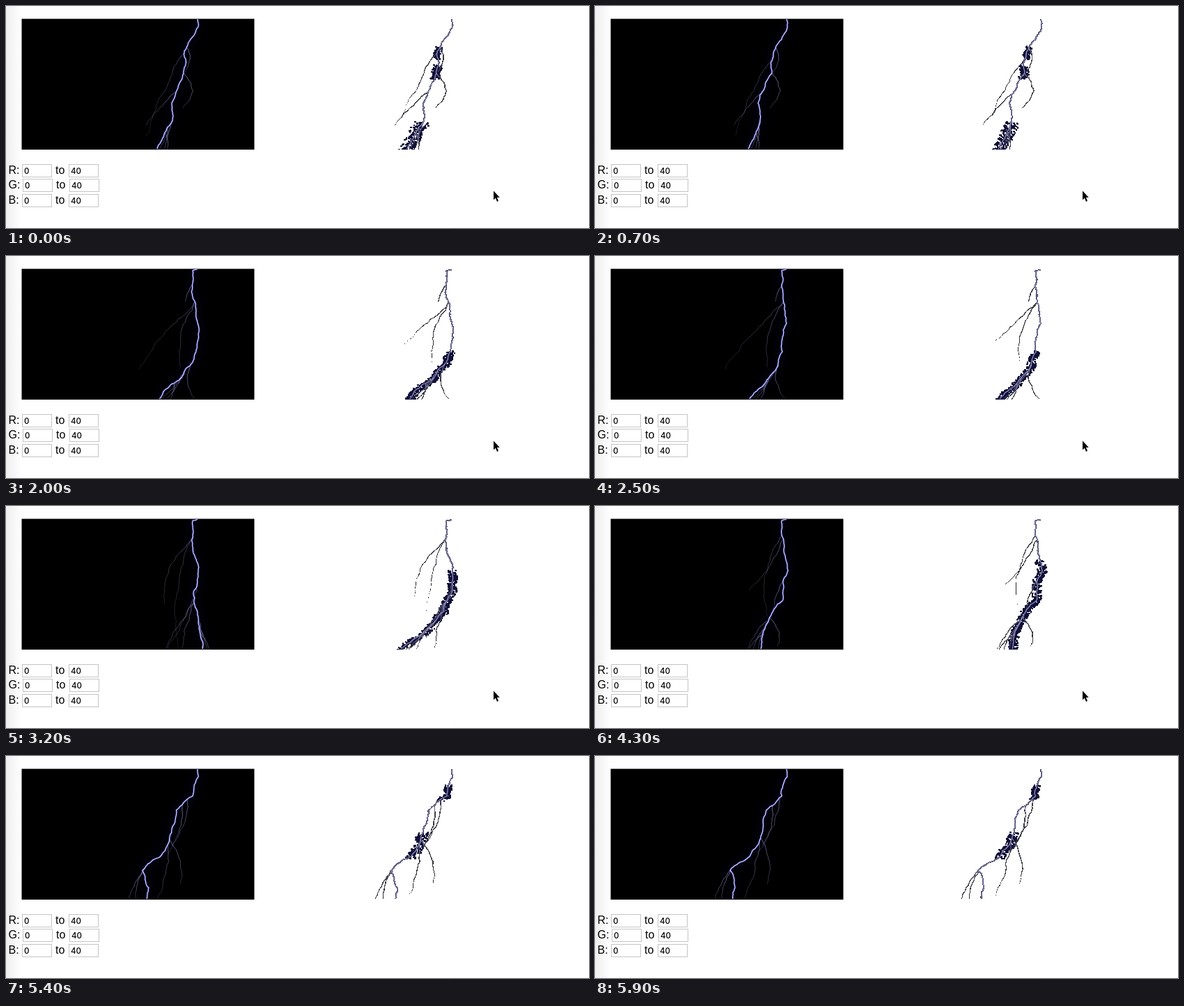
Recreate the animation shown at these times as an HTML page with a canvas. Size 837 by 320 pixels, loop 6000 ms.

```html
<!DOCTYPE html>
<html lang="en">
<head>
<meta charset="utf-8">
<title>Colour range key</title>
<style>
  html, body { margin: 0; width: 837px; height: 320px; overflow: hidden; background: #fff; }
  canvas { position: absolute; left: 0; top: 0; }
  span { position: absolute; font: 16px/18px "Liberation Sans", Arial, sans-serif; color: #000; white-space: pre; }
  .box {
    box-sizing: border-box; width: 43px; height: 19px; padding-left: 2px;
    border: 1px solid #c4c4c4; background: #fff;
    font: 500 11.5px/18px Inter, "Liberation Sans", sans-serif;
  }
</style>
</head>
<body>
<canvas id="stage" width="837" height="320"></canvas>
<script>
const STEP = 100, LOOP = 6000;
const VIEW = { x: 22.5, y: 18.5, w: 334, h: 188.5 };
const KEYED = { x: 361, y: 19, w: 369, h: 188 };
const GROUND = 207;

// How the channel leaves the cloud.
const SLOPED = [[275, 19], [276, 30], [270, 42]];
const HOOKED = [[275, 19], [268, 21], [268, 42]];

// main: bends of the channel; sides: [start y, end x, end y, bow];
// forks: sideways reach of the roots; glow: [top, bottom, width].
const bolts = [
  {
    at: 0, top: SLOPED, forks: 6,
    main: [[256, 65], [255, 97], [238, 140], [239, 165], [217, 206]],
    sides: [[66, 201, 188, -5], [122, 201, 172, -3], [95, 254, 147, 14], [58, 257, 95, 6]],
    glow: [[57, 75, 8], [85, 103, 10], [166, 207, 18]]
  },
  {
    at: 14, top: HOOKED, forks: 7,
    main: [[268, 58], [258, 64], [255, 97], [240, 123], [239, 165], [211, 206]],
    sides: [[64, 209, 180, -8], [135, 208, 180, -6], [100, 243, 150, 7], [140, 244, 206, 12]],
    glow: [[86, 135, 10], [167, 207, 14]]
  },
  {
    at: 25, top: HOOKED, forks: 6,
    main: [[270, 62], [275, 97], [269, 138], [250, 175], [222, 206]],
    sides: [[42, 259, 66, -2], [65, 187, 164, -5], [65, 247, 160, -10], [155, 273, 206, -8]],
    glow: [[138, 207, 10]]
  },
  {
    at: 32, top: HOOKED, forks: 4,
    main: [[272, 75], [276, 93], [269, 125], [270, 140], [279, 185], [282, 206]],
    trail: [[272, 75], [276, 93], [270, 135], [254, 165], [209, 206]],
    sides: [[43, 249, 206, -13], [43, 227, 142, -14], [108, 231, 206, 7], [137, 252, 206, -2], [137, 229, 206, -2]],
    glow: [[92, 207, 10]]
  },
  {
    at: 43, top: HOOKED, forks: -7,
    main: [[271, 65], [277, 93], [270, 108], [270, 135], [248, 168], [238, 206]],
    sides: [[42, 248, 160, -15], [47, 222, 122, 6], [105, 256, 150, -3], [158, 218, 206, -3], [160, 262, 202, 8]],
    glow: [[78, 207, 11]]
  },
  {
    at: 48, top: SLOPED, forks: -7,
    main: [[267, 50], [277, 93], [270, 108], [270, 135], [247, 168], [238, 206]],
    sides: [[60, 255, 160, -16], [120, 252, 158, -4], [158, 218, 206, -5], [150, 270, 206, 2]],
    glow: [[40, 207, 11]]
  },
  {
    at: 59, top: SLOPED, forks: 0,
    main: [[268, 58], [246, 78], [241, 105], [222, 145], [194, 165], [201, 190], [198, 206]],
    sides: [[60, 232, 140, 9], [70, 240, 130, 6], [118, 214, 206, 4], [118, 247, 185, 8], [163, 172, 206, -2], [163, 182, 206, -3]],
    glow: [[40, 62, 8], [110, 145, 12]]
  }
];

const ctx = document.getElementById('stage').getContext('2d');
const copy = document.createElement('canvas');
copy.width = KEYED.w;
copy.height = KEYED.h;
const keyCtx = copy.getContext('2d', { willReadFrequently: true });

function noise(a, b = 0) {
  const v = Math.sin(a * 127.1 + b * 311.7) * 43758.5453;
  return v - Math.floor(v);
}

// Midpoint displacement from a to b; appends everything after a.
function crack(a, b, seed, out) {
  const dx = b[0] - a[0], dy = b[1] - a[1];
  if (Math.hypot(dx, dy) < 4) return out.push(b);
  const push = (noise(seed) - .5) * .2;
  const mid = [(a[0] + b[0]) / 2 - dy * push, (a[1] + b[1]) / 2 + dx * push];
  crack(a, mid, seed * 2 + 1, out);
  crack(mid, b, seed * 2 + 2, out);
}

function jagged(bends, seed) {
  const out = [bends[0]];
  for (let i = 1; i < bends.length; i++) crack(bends[i - 1], bends[i], seed + i * .13, out);
  return out;
}

function branch(main, [y0, x1, y1, bow], seed) {
  const start = main.find(p => p[1] >= y0) || main[main.length - 1];
  const bends = [0, .25, .5, .75, 1].map(t => [
    start[0] + (x1 - start[0]) * t + bow * Math.sin(Math.PI * t),
    start[1] + (y1 - start[1]) * t
  ]);
  const reach = Math.hypot(x1 - start[0], y1 - start[1]);
  return { level: Math.max(.35, .85 - reach / 300), points: jagged(bends, seed) };
}

// Main channel first, then the side branches and the roots.
function grow(bolt, bends, step, drift) {
  const sway = y => drift * Math.min(1, Math.max(0, (y - 24) / 110)) *
    Math.sin(y / 31 + noise(step, 4) * 6.28);
  const main = jagged([...bolt.top, ...bends].map(([x, y]) => [x + sway(y), y]), step + 1);
  const foot = main[main.length - 1][0];
  const sides = bolt.sides.map(([y0, x, y, bow]) => [y0, x + sway(y), y, bow]);
  if (bolt.forks) {
    for (let k = 0; k < 3; k++) {
      sides.push([164 + k * 9, foot + bolt.forks * (k + .5), GROUND, bolt.forks * .4]);
    }
  }
  return { main, sides: sides.map((s, i) => branch(main, s, step + i * 3.1 + 2)) };
}

function line(c, points, color, width) {
  c.beginPath();
  points.forEach(([x, y]) => c.lineTo(x, y));
  c.strokeStyle = color;
  c.lineWidth = width;
  c.stroke();
}

// Branches lose light towards their tips.
function fading(c, { level, points }, rgb, width) {
  for (let i = 1; i < points.length; i++) {
    const alpha = level * (1 - .65 * i / points.length);
    line(c, points.slice(i - 1, i + 1), `rgba(${rgb},${alpha})`, width);
  }
}

const inRange = (points, [top, bottom]) => points.filter(([, y]) => y >= top && y <= bottom);

function drawPicture({ main, sides }) {
  ctx.save();
  ctx.fillStyle = '#000';
  ctx.fillRect(VIEW.x, VIEW.y, VIEW.w, VIEW.h);
  ctx.beginPath();
  ctx.rect(VIEW.x, VIEW.y, VIEW.w, VIEW.h);
  ctx.clip();
  ctx.lineJoin = 'round';
  ctx.shadowColor = 'rgba(40,40,190,.7)';
  ctx.shadowBlur = 18;
  line(ctx, main, 'rgba(30,30,120,.6)', 2.5);
  ctx.shadowBlur = 0;
  for (const side of sides) fading(ctx, side, '160,160,215', 1);
  line(ctx, main, 'rgba(70,70,190,.5)', 2.4);
  line(ctx, main, '#d4d4ff', 1.15);
  ctx.restore();
}

function drawKeyed({ main, sides }, glow, step) {
  const c = keyCtx;
  const sx = KEYED.w / VIEW.w, sy = KEYED.h / VIEW.h;
  c.setTransform(1, 0, 0, 1, 0, 0);
  c.fillStyle = '#000';
  c.fillRect(0, 0, KEYED.w, KEYED.h);
  c.setTransform(sx, 0, 0, sy, -VIEW.x * sx, -VIEW.y * sy);
  c.fillStyle = '#11103a';
  for (const range of glow) {
    inRange(main, range).forEach(([x, y], i) => {
      for (let k = 0; k < 9; k++) {
        const dx = (noise(i + k * 7, step) - .5) * range[2] * 1.15;
        c.fillRect(x + dx - 1.3, y + noise(k, i) * 4 - 2, 2.6, 2.6);
      }
    });
  }
  line(c, main, '#2e2c55', 1.9);
  for (const side of sides) fading(c, side, '165,165,190', 1.25);
  line(c, main, '#9c9cc6', .95);

  const image = c.getImageData(0, 0, KEYED.w, KEYED.h), d = image.data;
  for (let i = 0; i < d.length; i += 4) {
    if (Math.max(d[i], d[i + 1], d[i + 2]) <= 40) d[i + 3] = 0;
  }
  c.putImageData(image, 0, 0);
  ctx.drawImage(copy, KEYED.x, KEYED.y);
}

function drawPointer(x, y) {
  ctx.save();
  ctx.translate(x, y);
  ctx.beginPath();
  [[0, 0], [0, 13], [2.9, 10.3], [5, 15.4], [7, 14.5], [4.9, 9.6], [8.8, 9.4]]
    .forEach(p => ctx.lineTo(...p));
  ctx.closePath();
  ctx.lineJoin = 'round';
  ctx.strokeStyle = '#fff';
  ctx.lineWidth = 2;
  ctx.stroke();
  ctx.fillStyle = '#000';
  ctx.fill();
  ctx.restore();
}

function drawPage() {
  ctx.fillStyle = '#fff';
  ctx.fillRect(0, 0, 837, 320);
  const shade = ctx.createLinearGradient(0, 0, 22, 0);
  shade.addColorStop(0, '#eee');
  shade.addColorStop(1, '#fff');
  ctx.fillStyle = shade;
  ctx.fillRect(0, 0, 22, 320);
  ctx.fillStyle = '#fafafa';
  ctx.fillRect(640, 319, 197, 1);
}

function draw(step) {
  const gap = bolt => Math.abs(bolt.at - step);
  const bolt = bolts.reduce((best, b) => gap(b) < gap(best) ? b : best);
  const drift = Math.min(4, gap(bolt) * 1.5);
  drawPage();
  drawPicture(grow(bolt, bolt.main, step, drift));
  drawKeyed(grow(bolt, bolt.trail || bolt.main, step, drift), bolt.glow, step);
  if (step < 45) drawPointer(700, 266.5);
  else if (step === 45) drawPointer(722, 294);
}

function addText(text, x, y, kind = '') {
  const span = document.createElement('span');
  span.textContent = text;
  span.className = kind;
  span.style.left = x + 'px';
  span.style.top = y + 'px';
  document.body.append(span);
}

['R:', 'G:', 'B:'].forEach((label, row) => {
  const y = Math.floor(228 + row * 21.5), dx = row === 1 ? 1 : 0;
  addText(label, 3.5, y);
  addText('0', 23 + dx, y, 'box');
  addText('to', 71 + dx, y);
  addText('40', 90 + dx, y, 'box');
});

const start = performance.now();
let shown = -1;
function tick() {
  const step = Math.floor((performance.now() - start) % LOOP / STEP);
  if (step !== shown) draw(shown = step);
  requestAnimationFrame(tick);
}
tick();
</script>
</body>
</html>
```
